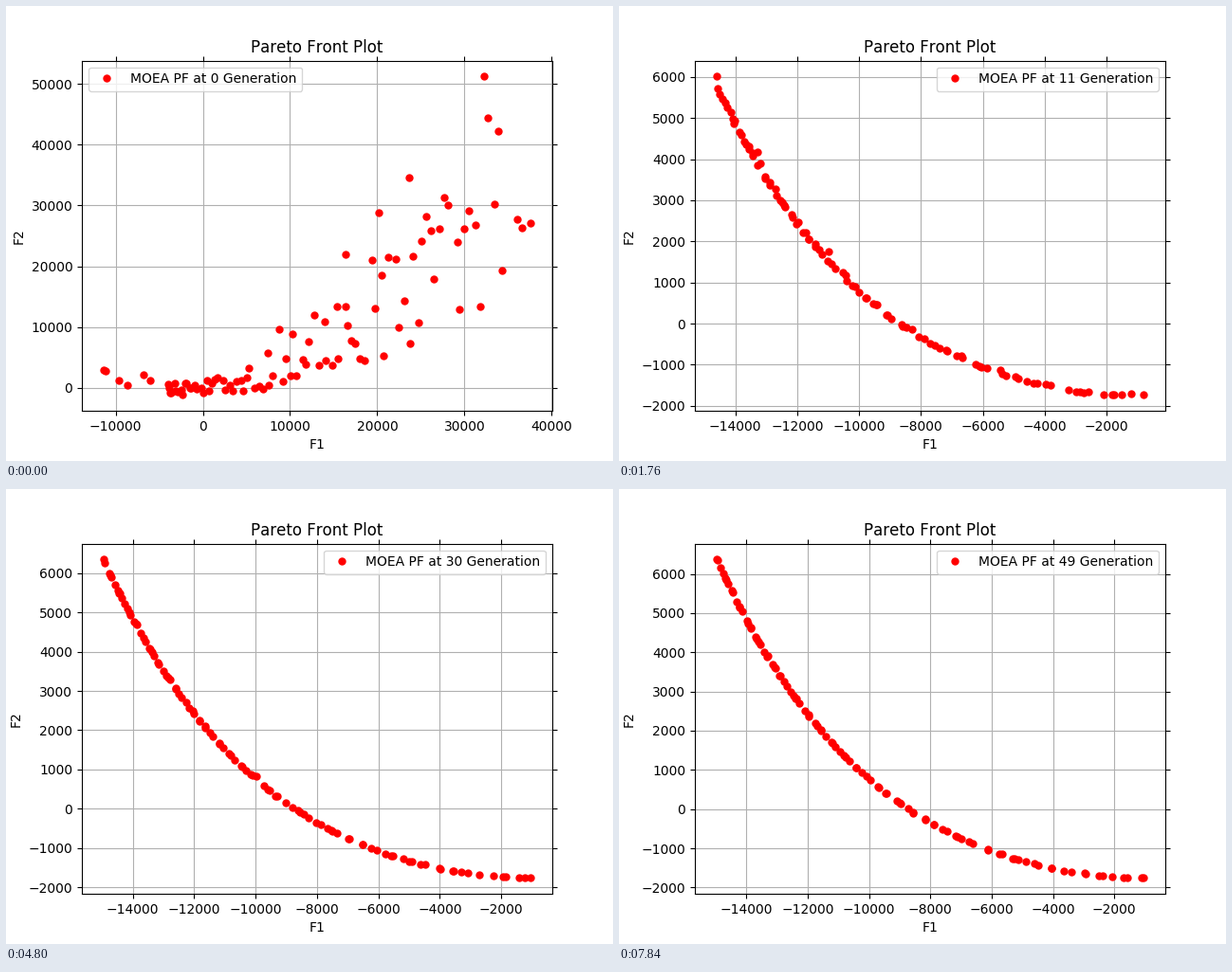
Recreate the animation shown at these times as a matplotlib script. Size 640 by 480 pixels, loop 8000 ms.

```python
import numpy as np
import matplotlib.pyplot as plt
from matplotlib.animation import FuncAnimation

GENS = 50
POP = 100
SETTLED = 8    # generation at which the front has formed
LIFETIME = 7   # generations until a member is replaced

plt.rcParams["text.kerning_factor"] = 6

# Extent of the front at a few generations
KEY_GENS = [8, 15, 23, 30, 41]
LEFT = [-14452, -14839, -14927, -14957, -14980]
RIGHT = [-390, -1326, -1225, -1037, -1035]
TOP = [5911, 6144, 6290, 6342, 6366]
BOTTOM = [-1725, -1750, -1758, -1759, -1759]

# Outermost members of the first population, in hundreds
OUTER = [
    (-114.2, 30), (-112, 28), (-96, 12), (-87, 5), (-68, 22), (-60, 12),
    (-23, -11.9), (164, 220), (202, 289), (237, 346), (322, 512.3),
    (327, 445), (339, 423), (335, 303), (343, 193), (361, 278),
    (366, 264), (376.3, 271),
]

rng = np.random.default_rng(12)
shift = rng.uniform(-0.8, 0.8, (GENS, POP))
noise = rng.exponential(1, (GENS, POP))
phase = rng.integers(0, LIFETIME, POP)


def first_population():
    """A cloud that fans out to the upper right."""
    n = POP - len(OUTER)
    u = (np.arange(n) + rng.uniform(0, 1, n)) / n
    x = -41 + 362 * u**1.3
    rise = np.maximum(x, 0)
    low = -10 + 0.0014 * rise**2
    high = 9 + 1.1 * rise
    y = low + (high - low) * rng.uniform(0, 1, n)**1.2
    pts = np.vstack([OUTER, np.column_stack([x, y])]) * 100
    return pts[np.argsort(pts[:, 0])]


def front(x):
    z = -(x + 1100) / 1000
    return -1760 + z**2 * (30.43 - 1.112 * z + 0.141 * z**2)


def front_population(gen):
    """Members crowd the steep side and thin out along the flat tail."""
    left, right, top, bottom = (
        np.interp(gen, KEY_GENS, k) for k in (LEFT, RIGHT, TOP, BOTTOM))
    i = np.arange(POP)
    life = (gen + phase) // LIFETIME
    t = np.clip((i + shift[life, i]) / (POP - 1), 0, 1)
    t[0], t[-1] = 0, 1
    x = left + (right - left) * (t + t**3) / 2
    spread = 12 + 85 * np.exp((SETTLED - gen) / 3)
    y = front(x) + spread * noise[life, i] * (0.4 - x / 15000)
    y = np.clip(y, bottom, top)
    y[0], y[-1] = top, bottom
    return np.column_stack([x, y])


FIRST = first_population()


def population(gen):
    pts = front_population(max(gen, SETTLED))
    if gen < SETTLED:
        w = 0.6**gen
        pts = w * FIRST + (1 - w) * pts
    return pts


fig, ax = plt.subplots(figsize=(6.4, 4.8), dpi=100)


def draw(gen):
    ax.clear()
    x, y = population(gen).T
    ax.plot(x, y, "ro", markersize=5, label=f"MOEA PF at {gen} Generation")
    ax.set_title("Pareto Front Plot", y=1)
    ax.set_xlabel("F1")
    ax.set_ylabel("F2")
    ax.tick_params(top=True, right=True)
    ax.grid(True)
    ax.legend(loc="best")
    return ax.get_children()


anim = FuncAnimation(fig, draw, frames=GENS, init_func=lambda: draw(0),
                     interval=160, repeat=True, repeat_delay=0, blit=False)
plt.show()
```
